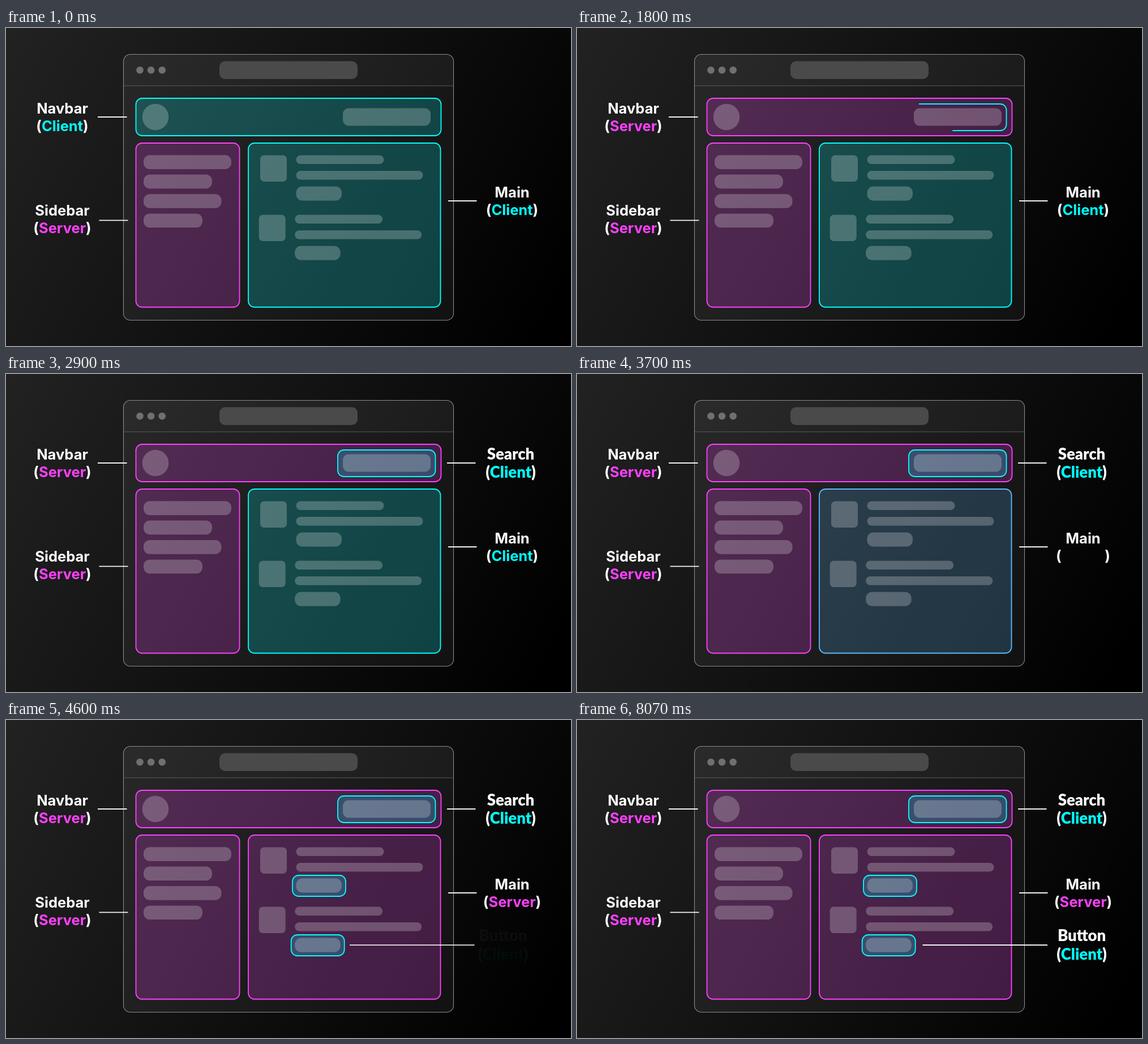
An HTML page with a canvas that plays this animation: 998 by 561 pixels, repeating every 8.23 s.

```html
<!DOCTYPE html>
<html lang="en">
<head>
<meta charset="utf-8">
<title>Server and client components</title>
<style>
html, body { margin: 0; width: 100%; height: 100%; overflow: hidden; background: #000; }
canvas { display: block; width: 998px; height: 561px; }
</style>
</head>
<body>
<canvas id="stage" width="998" height="561"></canvas>
<script>
const ctx = document.getElementById('stage').getContext('2d');
const W = 998, H = 561, LOOP = 8230;
const CYAN = [0, 255, 255], MAGENTA = [255, 64, 255];
const INTER = '700 25.5px Inter, sans-serif';
const LATO = '900 27.5px Lato, sans-serif';

const clamp = v => Math.max(0, Math.min(1, v));
const phase = (t, start, end) => clamp((t - start) / (end - start));
const quad = p => p < .5 ? 2 * p * p : 1 - 2 * (1 - p) ** 2;
const cubic = p => p < .5 ? 4 * p ** 3 : 1 - 4 * (1 - p) ** 3;
const easeOut = p => 1 - (1 - p) ** 2;
const lerp = (a, b, p) => a + (b - a) * p;
const mix = (a, b, p) => a.map((v, i) => Math.round(lerp(v, b[i], p)));
const rgba = (c, a = 1) => `rgba(${c.join(',')},${a})`;
const white = a => `rgba(255,255,255,${a})`;

// Rectangles are given by their edges: left, top, right, bottom.
function box(l, t, r, b, radius) {
  ctx.beginPath();
  ctx.roundRect(l, t, r - l, b - t, radius);
}

function bar(l, t, r, b, radius = 11) {
  box(l, t, r, b, radius);
  ctx.fillStyle = white(.23);
  ctx.fill();
}

function panel(l, t, r, b, color) {
  box(l, t, r, b, 11);
  ctx.fillStyle = rgba(color, .2);
  ctx.fill();
  ctx.lineWidth = 1.8;
  ctx.strokeStyle = rgba(color);
  ctx.stroke();
}

// Outline that draws itself clockwise, then fills.
function island(l, t, r, b, drawn, filled) {
  if (filled > 0) {
    box(l, t, r, b, 11);
    ctx.fillStyle = rgba(CYAN, .2 * filled);
    ctx.fill();
  }
  if (drawn <= 0) return;
  const rad = 11, start = l + 18;
  const length = 2 * (r - l + b - t) - 8 * rad + 2 * Math.PI * rad;
  ctx.beginPath();
  ctx.moveTo(start, t);
  ctx.arcTo(r, t, r, b, rad);
  ctx.arcTo(r, b, l, b, rad);
  ctx.arcTo(l, b, l, t, rad);
  ctx.arcTo(l, t, r, t, rad);
  ctx.closePath();
  ctx.lineWidth = 1.8;
  ctx.strokeStyle = rgba(CYAN);
  if (drawn < 1) ctx.setLineDash([drawn * length, length]);
  ctx.stroke();
  ctx.setLineDash([]);
}

function line(x1, x2, y, width = 1.8, color = '#f4f4f4') {
  ctx.beginPath();
  ctx.moveTo(x1, y);
  ctx.lineTo(x2, y);
  ctx.lineWidth = width;
  ctx.strokeStyle = color;
  ctx.stroke();
}

function write(str, x, y, color, align = 'center') {
  ctx.textAlign = align;
  ctx.fillStyle = color;
  ctx.fillText(str, x, y);
}

// spread: 0 = room for "Client", 1 = room for "Server"
function label(name, x, y1, y2, spread, client, server, font = INTER) {
  ctx.font = font;
  const half = lerp(ctx.measureText('(Client)').width,
                    ctx.measureText('(Server)').width, spread) / 2;
  write(name, x, y1, '#fff');
  write('(', x - half, y2, '#fff', 'left');
  write(')', x + half, y2, '#fff', 'right');
  if (client > 0) write('Client', x, y2, rgba(CYAN, client));
  if (server > 0) write('Server', x, y2, rgba(MAGENTA, server));
}

function callout(name, x1, x2, y, y1, y2, s) {
  ctx.save();
  ctx.globalAlpha = s.line;
  line(x1 - 20 * (1 - s.line), x2 - 20 * (1 - s.line), y);
  ctx.globalAlpha = s.text;
  label(name, 891.5 - 14 * (1 - s.text), y1, y2, 0, 1, 0, LATO);
  ctx.restore();
}

// A panel turns from client to server, then its client island appears.
function step(t) {
  return {
    turn: cubic(phase(t, 0, 760)),
    client: 1 - phase(t, 0, 320),
    server: phase(t, 380, 740),
    drawn: quad(phase(t, 540, 1040)),
    filled: phase(t, 900, 1180),
    line: easeOut(phase(t, 1020, 1400)),
    text: quad(phase(t, 1140, 1890))
  };
}

function drawWindow() {
  const bg = ctx.createLinearGradient(0, 0, W, H);
  bg.addColorStop(0, '#222');
  bg.addColorStop(.95, '#000');
  ctx.fillStyle = bg;
  ctx.fillRect(0, 0, W, H);

  box(207.5, 46.5, 790.5, 515.5, 12);
  ctx.fillStyle = white(.05);
  ctx.fill();
  box(207.5, 46.5, 790.5, 102, [12, 12, 0, 0]);
  ctx.fillStyle = white(.015);
  ctx.fill();
  line(208, 790, 102, 1, '#5a5a5a');
  box(207.5, 46.5, 790.5, 515.5, 12);
  ctx.lineWidth = 1.1;
  ctx.strokeStyle = '#8c8c8c';
  ctx.stroke();

  ctx.fillStyle = '#707070';
  for (let i = 0; i < 3; i++) {
    ctx.beginPath();
    ctx.arc(236.5 + 19.6 * i, 74.2, 6.3, 0, 2 * Math.PI);
    ctx.fill();
  }
  box(377, 58.5, 621, 90, 10);
  ctx.fillStyle = '#4a4a4a';
  ctx.fill();
}

function drawPost(dx, dy, s) {
  ctx.save();
  ctx.translate(dx, dy);
  bar(449, 224.5, 496, 271, 7);
  bar(512.5, 224.5, 667.5, 240, 7.7);
  bar(512.5, 252, 736.5, 267.5, 7.7);
  island(506, 274, 600, 311, s.drawn, s.filled);
  bar(512.5, 279.5, 593, 304.5);
  ctx.restore();
}

function draw(t) {
  const nav = step(t - 960), main = step(t - 3360);
  drawWindow();

  panel(229.5, 124, 768.5, 190, mix(CYAN, MAGENTA, nav.turn));
  bar(240.7, 133.7, 287.3, 180.3, 23.3);
  island(586, 134, 758.5, 181, nav.drawn, nav.filled);
  bar(595, 141.5, 750, 172.5, 10);

  panel(229.5, 203, 412.5, 492.5, MAGENTA);
  [398, 364, 380.5, 347].forEach((right, i) => {
    const top = 224.2 + 34.4 * i;
    bar(243, top, right, top + 24.7);
  });

  panel(428, 203, 767.5, 492.5, mix(CYAN, MAGENTA, main.turn));
  drawPost(0, 0, main);
  drawPost(-2.3, 105, main);

  line(162, 213.5, 157);
  line(164.5, 215.5, 339.3);
  line(781, 831.5, 305);
  label('Navbar', 99.5, 151.2, 181.5, nav.turn, nav.client, nav.server);
  label('Sidebar', 99.5, 331.4, 361.6, 1, 0, 1);
  label('Main', 894, 299.4, 329.6, main.turn, main.client, main.server);
  callout('Search', 779, 829.5, 157, 150.8, 183.3, nav);
  callout('Button', 610.5, 831, 397, 390.4, 423, main);
}

const begin = performance.now();
function tick() {
  draw((performance.now() - begin) % LOOP);
  requestAnimationFrame(tick);
}
tick();
</script>
</body>
</html>
```
